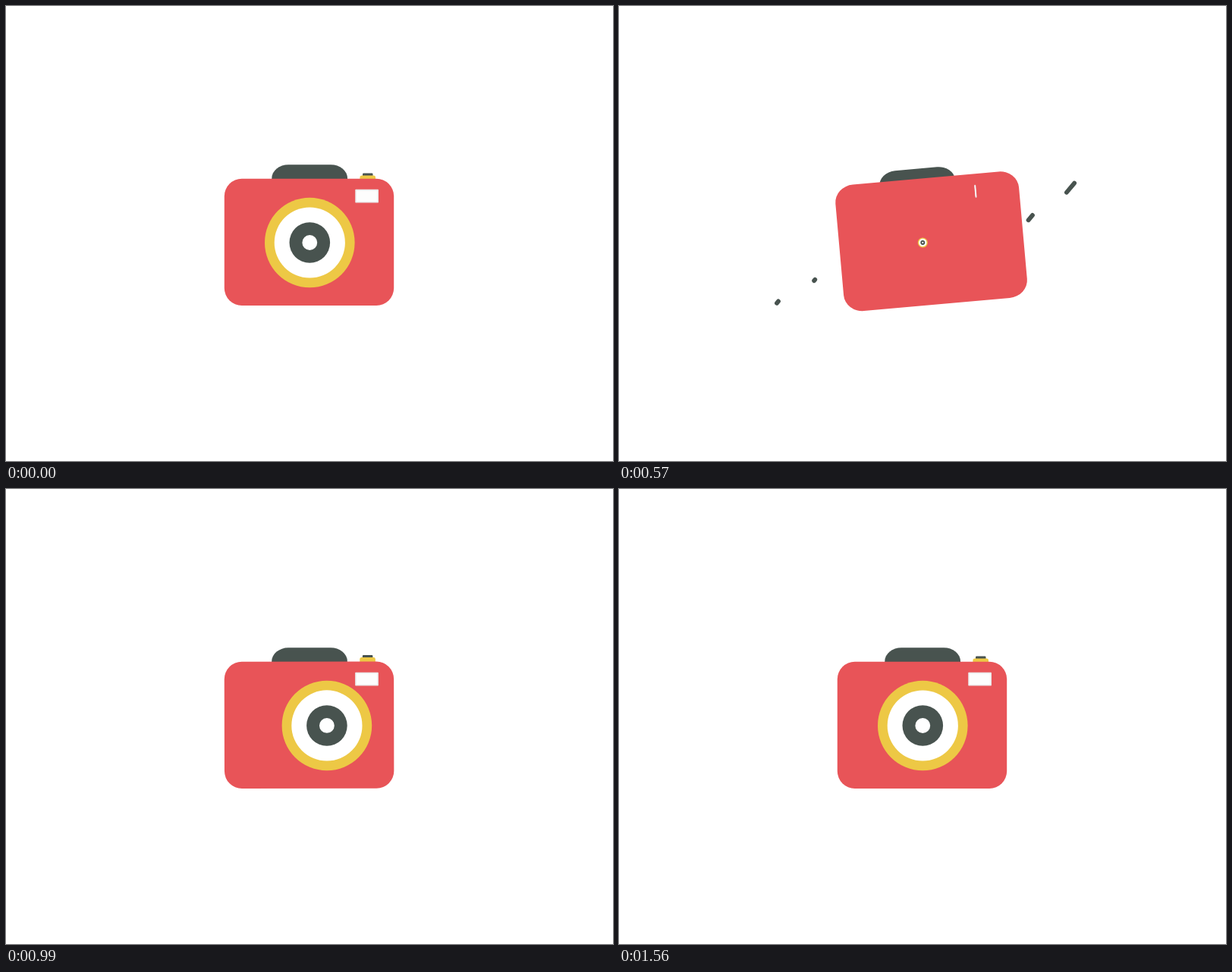
Animation of 800 by 600 pixels, one loop 1800 ms. Source, as an HTML page with a canvas:

```html
<!DOCTYPE html>
<html lang="en">
<head>
<meta charset="utf-8">
<title>Camera</title>
<style>
  html, body { margin: 0; width: 100%; height: 100%; overflow: hidden; background: #fff; }
  canvas { display: block; }
</style>
</head>
<body>
<canvas id="stage" width="800" height="600"></canvas>
<script>
const ctx = document.getElementById('stage').getContext('2d');
const LOOP = 1800, STEP = 30;
const RED = '#e85458', DARK = '#48534f', YELLOW = '#edc845', WHITE = '#fff', EDGE = '#e9e7e8';

// Progress from 0 to 1 between two times
const span = (t, from, to) => Math.min(1, Math.max(0, (t - from) / (to - from)));
const out = (p, power) => 1 - (1 - p) ** power;
const smooth = p => p * p * (3 - 2 * p);
const inOut = p => p < 0.5 ? 4 * p ** 3 : 1 - 4 * (1 - p) ** 3;
const backOut = (p, s) => 1 + (s + 1) * (p - 1) ** 3 + s * (p - 1) ** 2;

function box(color, x, y, w, h, rx = 0, ry = rx) {
  ctx.fillStyle = color;
  ctx.beginPath();
  ctx.roundRect(x, y, w, h, { x: rx, y: ry });
  ctx.fill();
}

function disc(color, x, r) {
  ctx.fillStyle = color;
  ctx.beginPath();
  ctx.arc(x, 0, r, 0, 2 * Math.PI);
  ctx.fill();
}

// Diagonal streak on the line x + y = sum, running from start to end
function streak(t, sum, start, end, stop, gone, shift = 0) {
  if (t < 210 || t >= gone) return;
  const at = p => start + (end - start) * p;
  const head = at(out(span(t, 200, stop), 3));
  const tail = at(out(span(t, 305, stop + 20), 2.6));
  ctx.strokeStyle = DARK;
  ctx.lineWidth = 5.8;
  ctx.lineCap = 'round';
  ctx.beginPath();
  ctx.moveTo(sum / 2 + tail + shift, sum / 2 - tail);
  ctx.lineTo(sum / 2 + head + shift + 0.01, sum / 2 - head);
  ctx.stroke();
}

function drawHat(t) {
  if (t < 510) return;
  const drop = 21 * (1 - backOut(span(t, 505, 900), 2.9));
  box(DARK, -49.7, -102.8 + drop, 99.7, 36, 22, 18);
}

function drawButton(t) {
  if (t < 660) return;
  const drop = 9 * (1 - backOut(span(t, 660, 1140), 2.6));
  box(DARK, 70, -91.5 + drop, 13.5, 6, 1.2);
  box(YELLOW, 66.4, -88.6 + drop, 20.6, 8, 2.5);
}

function drawBody(t, slide) {
  const sx = Math.max(0.02, t < 255 ? 0 : backOut(span(t, 255, 720), 1.7));
  const sy = out(span(t, 90, 625), 5);
  box(RED, -112.2 + slide, -0.7 - 83.6 * sy, 223.4 * sx, 167.2 * sy, 23 * sx, 23 * sy);
}

function drawWindow(t) {
  if (t < 330) return;
  const w = 2 + 28.8 * smooth(span(t, 690, 900));
  const h = 0.5 + 17.2 * smooth(span(t, 330, 600));
  box(EDGE, 75.6 - w / 2, -61.3 - h / 2, w, h, Math.min(1, w / 2, h / 2));
  const iw = Math.max(w - 3, w * 0.6), ih = Math.max(h - 3, h * 0.6);
  box('#fdfdfd', 75.6 - iw / 2, -61.3 - ih / 2, iw, ih);
}

function drawLens(t) {
  const size = smooth(span(t, 510, 800));
  const x = 0.3 + 31.8 * (inOut(span(t, 780, 1140)) - inOut(span(t, 1140, 1560)));
  disc(YELLOW, x, 59.3 * size);
  disc(WHITE, x, 46.6 * size);
  disc(DARK, x, 26.8 * size);
  disc(WHITE, x, 9.9 * size);
}

function draw(t) {
  const angle = -59 * (1 - span(t, 90, 1330)) ** 5;
  const slide = -angle / 2;
  ctx.setTransform(1, 0, 0, 1, 0, 0);
  ctx.fillStyle = WHITE;
  ctx.fillRect(0, 0, 800, 600);
  ctx.translate(400, 312);
  ctx.rotate(angle * Math.PI / 180);
  drawHat(t);
  drawButton(t);
  drawBody(t, slide);
  drawWindow(t);
  drawLens(t);
  streak(t, -138.5, -40, -132, 640, 670, slide);
  streak(t, -112, -42, -93.5, 640, 670, slide);
  streak(t, 124.5, -23.5, 87.3, 700, 750);
  streak(t, 146, -73, 137, 700, 750);
}

function tick() {
  const t = Math.floor(performance.now() % LOOP / STEP) * STEP;
  draw(t < 90 ? LOOP : t);
  requestAnimationFrame(tick);
}
tick();
</script>
</body>
</html>
```
